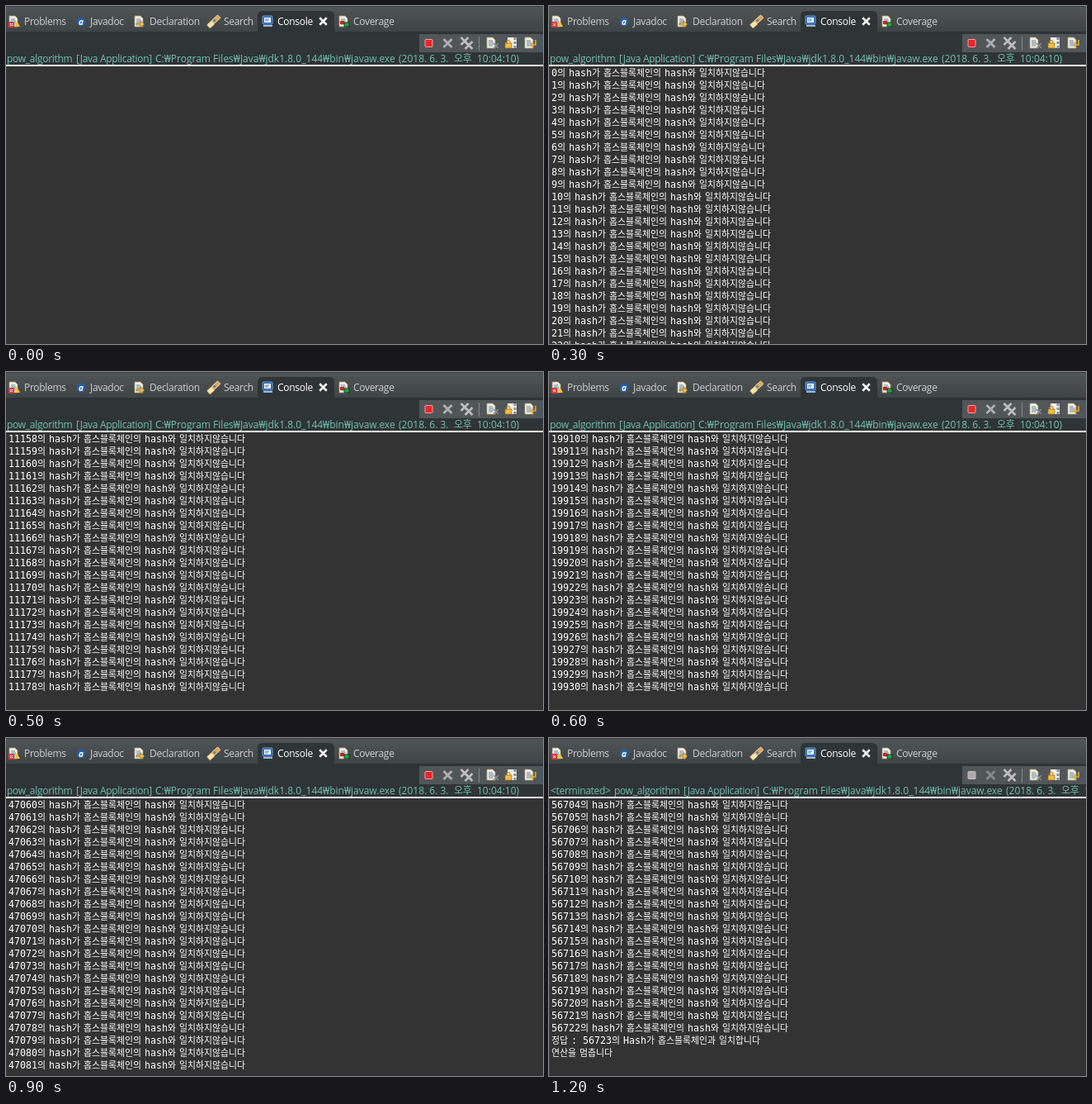
Animation of 651 by 409 pixels, one loop 2100 ms. Source, as an HTML page:

```html
<!DOCTYPE html>
<html lang="ko">
<head>
<meta charset="utf-8">
<title>Console</title>
<style>
html, body { margin: 0; width: 100%; height: 100%; overflow: hidden; background: #333; }
svg { display: block; width: 651px; height: 409px; }
text { white-space: pre; }
.ui { font: 12px "Open Sans", "Noto Sans", "Noto Sans CJK KR", sans-serif; letter-spacing: -.3px; fill: #cfd1d2; }
.title { fill: #73c2ae; }
.wide { letter-spacing: 0; }
.active { fill: #fff; }
.log { font: 11.63px "DejaVu Sans Mono", monospace; fill: #fff; }
.ko { font: 10.87px "Noto Sans CJK KR", "Noto Sans KR", "Noto Sans CJK JP", sans-serif; word-spacing: 1px; }
</style>
</head>
<body>
<svg viewBox="0 0 651 409">
  <defs>
    <linearGradient id="bar" x2="0" y2="1">
      <stop stop-color="#515558"/><stop offset="1" stop-color="#3f4447"/>
    </linearGradient>
    <g id="page">
      <path d="M-5-7H2L5-4V6H-5Z" fill="#f2f0e2" stroke="#a89a72" stroke-width=".8"/>
      <path d="M-3-3H2M-3-1H3M-3 1H3M-3 3H2" stroke="#5579a8" stroke-width=".9"/>
    </g>
    <path id="x" d="M-5-5L5 5M5-5L-5 5" stroke-width="3"/>
  </defs>

  <rect width="651" height="409" fill="#333"/>
  <rect width="651" height="31" fill="url(#bar)"/>
  <rect width="651" height="1" fill="#3b3f42"/>
  <rect y="31" width="651" height="40" fill="#2f3436"/>
  <path d="M305 31V12Q305 6 311 6H392Q398 6 398 12V31Z" fill="#2f3436"/>
  <rect x="501" y="34" width="150" height="22" fill="#515658"/>
  <rect x="648" y="35" width="3" height="21" fill="#46586a"/>
  <rect y="71" width="651" height="2" fill="#f4f6f5"/>
  <rect y="73" width="1" height="336" fill="#3f4345"/>

  <!-- tab icons -->
  <g transform="translate(9 19)">
    <use href="#page"/>
    <rect x="-6" y="0" width="7" height="7" rx="1" fill="#d93b3f"/>
    <path d="M-4 2L-1 5M-1 2L-4 5" stroke="#fff"/>
    <path d="M4-1L8 6H1Z" fill="#f2c53d"/>
  </g>
  <circle cx="91" cy="19" r="5.5" fill="#2a5d9c"/>
  <text x="88" y="22.5" font-family="Open Sans, sans-serif" font-size="10" font-weight="700" font-style="italic" fill="#fff">a</text>
  <g transform="translate(161 19)">
    <use href="#page"/>
    <path d="M-3 2H2V-1L7 3L2 7V4H-3Z" fill="#f0c04a" stroke="#8c671f" stroke-width=".7"/>
  </g>
  <g transform="translate(252 19) rotate(-42)">
    <rect x="-9" y="-3" width="8" height="6" rx="1" fill="#f5e5ad" stroke="#a77b35" stroke-width=".7"/>
    <rect x="-1" y="-3" width="10" height="5" rx="1" fill="#dba85a" stroke="#f4dfad" stroke-width=".8"/>
    <rect x="0" y="-2" width="3" height="3" fill="#777f91"/>
  </g>
  <g transform="translate(317 18)">
    <rect x="-6" y="-6" width="12" height="10" rx="1" fill="#2c66ac" stroke="#6b9bd0"/>
    <rect x="-4" y="-4" width="8" height="6" fill="#f7fbff"/>
    <path d="M-3-2H2M-3 0H1" stroke="#4773a6"/>
    <path d="M-5 6H6" stroke="#9dbadd" stroke-width="2"/>
  </g>
  <g transform="translate(409 19)">
    <use href="#page"/>
    <rect x="-4" y="-1" width="5" height="4" fill="#c72727"/>
    <rect x="1" y="1" width="6" height="5" fill="#26a33c" stroke="#102c14" stroke-width=".8"/>
  </g>
  <use href="#x" transform="translate(384.5 18.5) scale(.85)" stroke="#f5f5f5"/>

  <!-- toolbar icons -->
  <rect id="stop" x="508" y="40.5" width="9" height="9" rx="1"/>
  <use href="#x" id="close" x="535.5" y="45"/>
  <g id="closeAll" stroke="#bdbdbd">
    <use href="#x" transform="translate(556 42.5) scale(.9)"/>
    <use href="#x" transform="translate(561 47.5) scale(.9)"/>
  </g>
  <path d="M573.5 37V54" stroke="#85898b"/>
  <use href="#page" x="588" y="45"/>
  <use href="#x" transform="translate(594 48) scale(.55)" stroke="#8c9094"/>
  <g transform="translate(612 45)">
    <rect x="-4" y="-7" width="11" height="13" fill="#f2f0e2"/>
    <path d="M5-7V6" stroke="#7d8fa6" stroke-width="3" stroke-dasharray="3 2"/>
    <path d="M-5 1V-2Q-3-5-1-2V1" fill="none" stroke="#c18f2c" stroke-width="1.3"/>
    <rect x="-7" y="0" width="8" height="6" fill="#f0bd45" stroke="#946718" stroke-width=".7"/>
  </g>
  <g transform="translate(634 45)">
    <use href="#page"/>
    <path d="M8-4V2H3M5-1L2 2L5 5" fill="none" stroke="#e2aa35" stroke-width="1.6"/>
  </g>

  <g class="ui" id="tabs"></g>
  <g class="ui title" id="title"></g>
  <g class="log" id="log"></g>
</svg>
<script>
const NS = "http://www.w3.org/2000/svg";
const $ = id => document.getElementById(id);
const LOOP = 2100, STEP = 100, ROW = 15;
const TAIL = "의 hash가 홉스블록체인의 hash와 일치하지않습니다";

function add(parent, tag, attrs, text = "") {
  const el = document.createElementNS(NS, tag);
  for (const key in attrs) el.setAttribute(key, attrs[key]);
  el.textContent = text;
  return parent.appendChild(el);
}

// Each label is [text, x, optional class].
const addLabels = (parent, y, labels) =>
  labels.forEach(([text, x, style = ""]) => add(parent, "text", { x, y, class: style }, text));

addLabels($("tabs"), 23, [
  ["Problems", 22], ["Javadoc", 102], ["Declaration", 174],
  ["Search", 264], ["Console", 329, "active"], ["Coverage", 421]
]);

const state = add($("title"), "text", { x: 2, y: 68 }, "<terminated>");
const path = add($("title"), "g", {});
addLabels(path, 68, [
  ["pow_algorithm", 1], ["[Java Application]", 85],
  ["C:₩Program Files₩Java₩jdk1.8.0_144₩bin₩javaw.exe", 181, "wide"],
  ["(2018. 6. 3.", 476, "wide"], ["오후", 543], ["10:04:10)", 571, "wide"]
]);

// Hangul and the spaces after it use the proportional face.
function addLine(text, row) {
  const line = add($("log"), "text", { x: 3, y: 85 + row * ROW });
  for (const run of text.match(/[가-힣][가-힣 ]*|[^가-힣]+/g))
    add(line, "tspan", /[가-힣]/.test(run) ? { class: "ko" } : {}, run);
}

const count = (from, rows) => Array.from({ length: rows }, (_, i) => from + i + TAIL);

function linesAt(step) {
  if (step < 3) return [];
  if (step === 3) return count(0, 23);
  if (step === 4) return count(3674, 23);
  if (step < 8) return count(19910 + (step - 6) * 8752, 21);
  if (step === 8) {
    const lines = count(37414, 21);
    lines[20] = lines[20].slice(0, -1) + "?";
    return lines;
  }
  if (step === 9) return count(47060, 22);
  return [...count(56704, 19), "정답 : 56723의 Hash가 홉스블록체인과 일치합니다", "연산을 멈춥니다"];
}

let shown = -1;
function draw(time) {
  const step = Math.min(10, Math.floor(time % LOOP / STEP));
  if (step === shown) return;
  shown = step;
  const done = step >= 10;
  $("log").replaceChildren();
  linesAt(step).forEach(addLine);
  state.setAttribute("visibility", done ? "visible" : "hidden");
  path.setAttribute("transform", `translate(${done ? 78 : 0} 0)`);
  $("stop").setAttribute("fill", done ? "#aaa" : "#e8262c");
  $("stop").setAttribute("stroke", done ? "#c4c4c4" : "#f6a09c");
  $("close").setAttribute("stroke", done ? "#85898b" : "#adadad");
}

function tick(now) {
  draw(now);
  requestAnimationFrame(tick);
}
draw(0);
requestAnimationFrame(tick);
</script>
</body>
</html>
```
